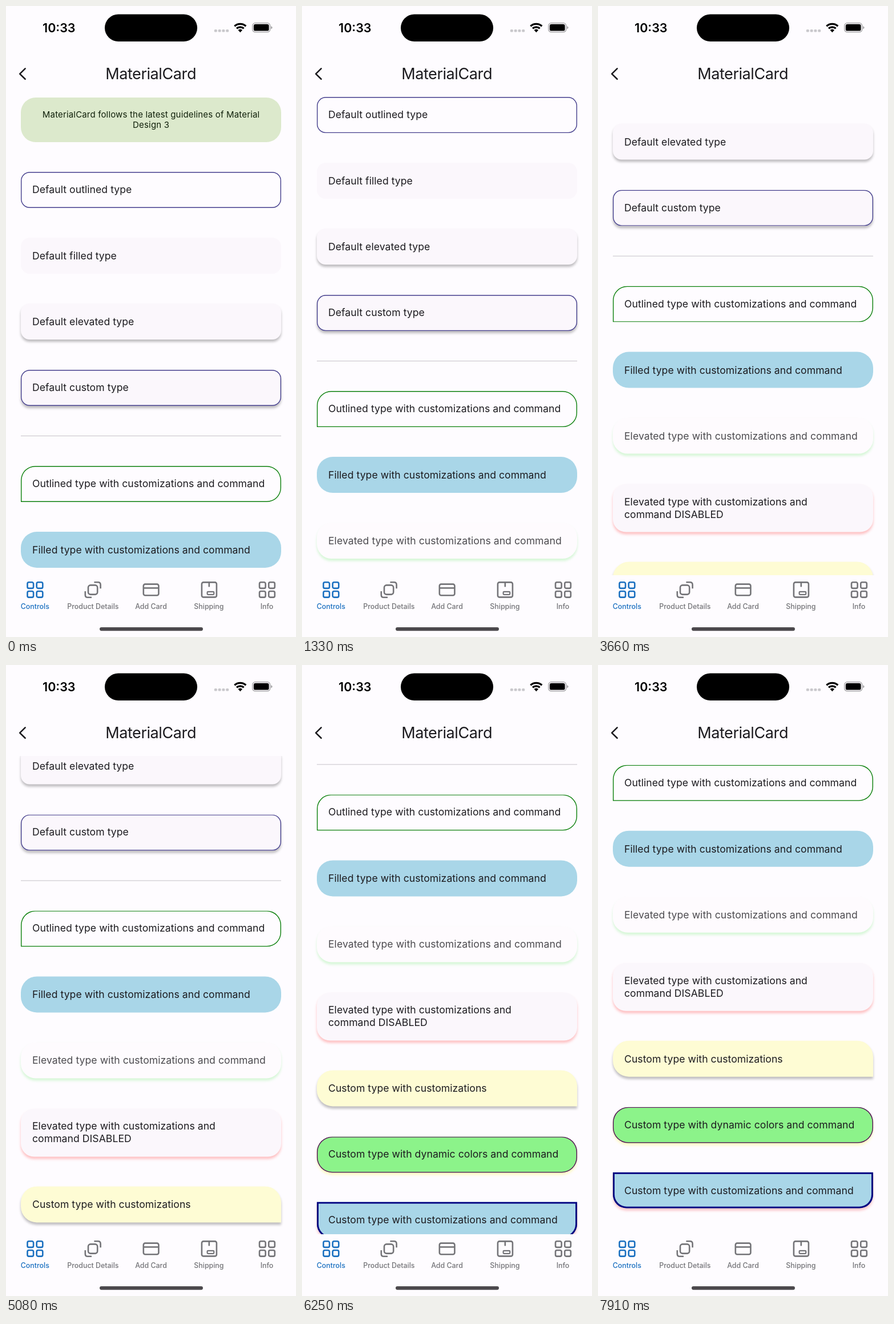
An HTML page that plays this animation: 508 by 1103 pixels, repeating every 8 s.

```html
<!DOCTYPE html>
<html lang="en">
<head>
<meta charset="utf-8">
<title>MaterialCard</title>
<style>
  html, body { margin: 0; width: 100%; height: 100%; overflow: hidden; background: #fefcff; }
  body { position: relative; font-family: Inter, "Liberation Sans", sans-serif; color: #1c1b1f; }
  #view { position: absolute; left: 0; top: 159px; width: 508px; height: 836px; overflow: hidden; }
  #list { position: absolute; left: 0; top: -159px; width: 508px; }
  .card {
    position: absolute; left: 25.8px; width: 456.6px;
    font-size: 17.6px; line-height: 21.5px; letter-spacing: .05px; white-space: pre;
  }
  .card span { position: absolute; left: 20.2px; top: 20.5px; }
  .info { font-size: 15px; line-height: 18.2px; letter-spacing: .17px; text-align: center; color: #10200a; }
  .info span { left: 0; right: 0; top: 21.5px; }
  .rule { position: absolute; left: 25.8px; width: 456.6px; top: 750.6px; height: 1.2px; background: #c5c2c8; }
  svg { position: absolute; left: 0; top: 0; }
  text { text-anchor: middle; }
  .tab { font-size: 12.4px; font-weight: 500; stroke: none; }
</style>
</head>
<body>
<div id="view"><div id="list"><div class="rule"></div></div></div>

<svg width="508" height="1103" viewBox="0 0 508 1103" fill="none">
  <text x="92.8" y="46" font-size="21.5" font-weight="600" fill="#000">10:33</text>
  <rect x="173" y="14.5" width="162" height="47.5" rx="23.7" fill="#000"/>
  <g fill="#c9c8cc">
    <rect x="364.8" y="41" width="5" height="4.6" rx="1.5"/>
    <rect x="371.6" y="41" width="5" height="4.6" rx="1.5"/>
    <rect x="378.4" y="41" width="5" height="4.6" rx="1.5"/>
    <rect x="385.2" y="41" width="5" height="4.6" rx="1.5"/>
  </g>
  <g stroke="#000" stroke-width="3.3">
    <path d="M400.3 35.2A14.9 14.9 0 0 1 420.3 35.2"/>
    <path d="M404 39.3A9.4 9.4 0 0 1 416.6 39.3"/>
  </g>
  <path d="M406.5 42A6 6 0 0 1 414.1 42L410.3 46.3Z" fill="#000"/>
  <rect x="431.7" y="29.7" width="31" height="16" rx="5" stroke="#a09fa2" stroke-width="1.3"/>
  <rect x="433.8" y="31.8" width="26.8" height="11.8" rx="3.2" fill="#000"/>
  <path d="M464.2 35.2q2.4 .8 2.4 2.5t-2.4 2.5z" fill="#a09fa2"/>

  <path d="M33.6 109.4L24.2 118.6L33.6 127.8" stroke="#1c1b1f" stroke-width="2.6" stroke-linecap="round" stroke-linejoin="round"/>
  <text x="253.6" y="128.2" font-size="27" letter-spacing="-.4" fill="#1c1b1f">MaterialCard</text>

  <defs>
    <g id="grid" stroke-width="2.6">
      <rect x="-13.3" y="1007.3" width="10.6" height="10.6" rx="2.6"/>
      <rect x="2.9" y="1007.3" width="10.6" height="10.6" rx="2.6"/>
      <rect x="-13.3" y="1023" width="10.6" height="10.6" rx="2.6"/>
      <rect x="2.9" y="1023" width="10.6" height="10.6" rx="2.6"/>
    </g>
  </defs>
  <g stroke="#1b70c0">
    <use href="#grid" x="50.8"/>
    <text class="tab" x="50.8" y="1053.6" fill="#1b70c0">Controls</text>
  </g>
  <g stroke="#747478" stroke-width="2.6">
    <rect x="144" y="1012.4" width="16.2" height="16.2" rx="4"/>
    <path d="M154.4 1007.3H161.2Q165.6 1007.3 165.6 1011.7V1018.2M138.8 1023V1029.4Q138.8 1033.8 143.2 1033.8H150"/>
    <rect x="240.8" y="1010.6" width="26.6" height="19.6" rx="3"/>
    <path d="M240.8 1017.4H267.4"/>
    <rect x="342.9" y="1007.4" width="26" height="26" rx="3"/>
    <path d="M355.8 1007.4V1015.4"/>
    <rect x="352.6" y="1023.8" width="11.6" height="5" rx="1.2" stroke-width="2.2"/>
    <use href="#grid" x="457.3"/>
  </g>
  <g fill="#747478">
    <text class="tab" x="152.4" y="1053.6">Product Details</text>
    <text class="tab" x="254" y="1053.6">Add Card</text>
    <text class="tab" x="355.4" y="1053.6">Shipping</text>
    <text class="tab" x="457" y="1053.6">Info</text>
  </g>
  <rect x="164" y="1086" width="181" height="6.2" rx="3.1" fill="#4c494d"/>
</svg>

<script>
const list = document.getElementById('list');
const tint = '#fbf7fc', sky = '#a9d6e8';
const shade = color => `0 4px 4px ${color}`;
// Inset shadows allow strokes of fractional width
const line = (color, width = 1.4) => `inset 0 0 0 ${width}px ${color}`;
const grey = shade('rgba(0,0,0,.25)');
const violet = line('#453f8d');

// top, text, background, radius, strokes and shadows, height
const cards = [
  [159.5, 'MaterialCard follows the latest guidelines of Material\nDesign 3', '#dce9cc', '26px', [], 78.5],
  [289.8, 'Default outlined type', 'none', '15.5px', [violet]],
  [405, 'Default filled type', tint, '15.5px', []],
  [520.3, 'Default elevated type', tint, '15.5px', [grey]],
  [635.5, 'Default custom type', tint, '15.5px', [violet, grey]],
  [803.7, 'Outlined type with customizations and command', 'none', '25px 25px 25px 0', [line('#0c800c')]],
  [919, 'Filled type with customizations and command', sky, '28px', []],
  [1034.3, 'Elevated type with customizations and command', '#fefbfe', '26px', [shade('rgba(144,238,144,.36)')]],
  [1149.6, 'Elevated type with customizations and\ncommand DISABLED', tint, '23px', [shade('rgba(255,90,90,.36)')], 84],
  [1286.4, 'Custom type with customizations', '#fefcd4', '28px 28px 0 28px', [grey]],
  [1401.7, 'Custom type with dynamic colors and command', '#8cf38a', '27px', [line('#5a0c5c'), shade('rgba(255,250,110,.4)')]],
  [1516.4, 'Custom type with customizations and command', sky, '0 0 24px 24px', [line('#000080', 3), shade('rgba(255,90,90,.32)')]]
];

cards.forEach(([top, text, background, borderRadius, shadows, height = 63], i) => {
  const card = document.createElement('div');
  const label = document.createElement('span');
  card.className = i ? 'card' : 'card info';
  label.textContent = text;
  if (text.startsWith('Elevated') && !text.endsWith('DISABLED')) label.style.color = '#4c4b4f';
  Object.assign(card.style, {
    background, borderRadius, top: top + 'px', height: height + 'px', boxShadow: shadows.join() || 'none'
  });
  card.append(label);
  list.append(card);
});

const LOOP = 8000, FPS = 12;
// first step, last step, scroll from, scroll to, warp
const moves = [
  [5, 24, 0, 216, 1.035],
  [37, 49, 216, 372.3, 1],
  [60, 75, 372.3, 577.6, 1],
  [88, 95, 577.6, 629.3, 1]
];

const stepStart = k => Math.floor(k * 100 / FPS) * 10;

function stepAt(ms) {
  const k = Math.floor(ms * FPS / 1000) + 1;
  return stepStart(k) > ms ? k - 1 : k;
}

function scrollAt(step) {
  let y = 0;
  for (const [a, b, from, to, warp] of moves) {
    if (step < a) break;
    const p = Math.min(1, (step - a) / (b - a)) ** warp;
    y = from + (to - from) * (1 - Math.cos(Math.PI * p)) / 2;
  }
  return y;
}

const begin = performance.now();
function draw(now) {
  const ms = Math.max(0, now - begin) % LOOP;
  list.style.transform = `translateY(${-scrollAt(stepAt(ms)).toFixed(2)}px)`;
  requestAnimationFrame(draw);
}
draw(begin);
</script>
</body>
</html>
```
